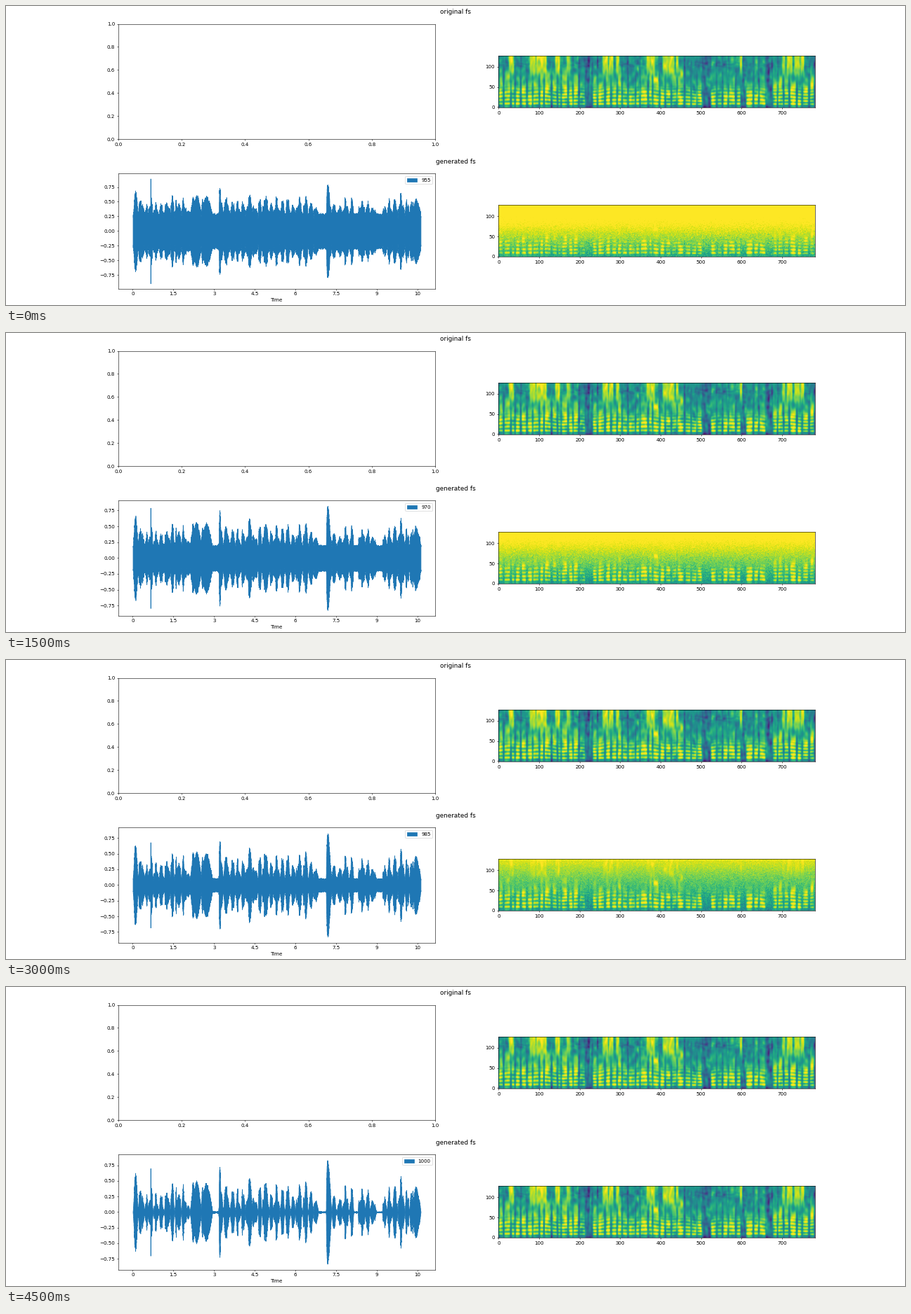
A matplotlib script for the animation above (5000 ms loop, 1280 px wide and 427 px high).

```python
import numpy as np
import matplotlib.pyplot as plt
from matplotlib.animation import FuncAnimation

DPI = 64
plt.rcParams.update({
    "font.family": "DejaVu Sans", "font.size": 8, "figure.titlesize": 10,
    "axes.linewidth": 0.64, "patch.linewidth": 0.8,
    "xtick.major.size": 2.8, "ytick.major.size": 2.8,
    "xtick.major.pad": 2.8, "ytick.major.pad": 2.8,
    "xtick.major.width": 0.64, "ytick.major.width": 0.64,
})

STEPS = 10
DURATION = 10.626          # seconds of audio
ROWS, COLS = 128, 782
SYLLABLE = 0.2             # mean length in seconds

# Spoken phrases, separated by pauses (seconds)
PHRASES = [(0, 2.93), (3.15, 6.85), (7.12, 8.15), (8.3, 9.0), (9.2, DURATION)]
# Stressed sounds: onset, length, loudness
STRESSED = [(.03, .16, .63), (2.25, .28, .51), (2.58, .36, .48),
            (3.17, .09, .74), (4.24, .17, .57), (6.33, .13, .5),
            (9.85, .1, .58), (10.35, .26, .42)]
MAIN_ONSET, MAIN_LENGTH = 7.13, .2
CLICK_AT = .653


def split_syllables():
    rng = np.random.default_rng(12)
    spans = []
    for start, end in PHRASES:
        count = round((end - start) / SYLLABLE)
        edges = np.linspace(start, end, count + 1)
        edges[1:-1] += rng.uniform(-.045, .045, count - 1)
        spans += zip(edges[:-1], edges[1:], rng.uniform(.2, .42, count))
    return spans


def smooth(a, width, axis=-1):
    window = np.hanning(width + 2)[1:-1]
    window /= window.sum()
    return np.apply_along_axis(np.convolve, axis, a, window, "same")


def field(rng, height, width):
    """Blurred unit-variance noise over the spectrogram."""
    a = rng.standard_normal((ROWS, COLS))
    a = smooth(smooth(a, height, 0), width, 1)
    return a / a.std()


def sigmoid(x):
    return 1 / (1 + np.exp(-np.clip(x, -40, 40)))


def box(x, start, end, edge=.012):
    return sigmoid((x - start) / edge) * sigmoid((end - x) / edge)


def bump(time, start, length, skew):
    phase = np.clip((time - start) / length, 0, 1)
    return np.abs(np.sin(np.pi * phase ** skew))


def clean_spectrogram():
    rng = np.random.default_rng(4)
    time = np.linspace(0, DURATION, COLS)
    row = np.arange(ROWS)[:, None]
    voiced, reach, hiss = np.zeros(COLS), np.full(COLS, 60.), np.zeros(COLS)
    for start, end, loud in SYLLABLES:
        length = end - start
        span = box(time, start + .08 * length, end - .14 * length)
        voiced = np.maximum(voiced, (.7 + .7 * loud) * span)
        reach += span * rng.uniform(-18, 30)
        if rng.random() < .45:
            width = rng.uniform(.08, .24)
            hiss = np.maximum(hiss, box(time, end - width / 2, end + width / 2))
    voiced = np.minimum(voiced, 1)

    pitch = 205 + 16 * np.sin(time * 1.7) + 10 * np.sin(time * 5.3)
    mel = row * 45 / ROWS
    hertz = np.where(mel < 15, mel * 200 / 3, 1000 * 6.4 ** ((mel - 15) / 27))
    stripes = np.cos(2 * np.pi * hertz / pitch) * sigmoid((42 - row) / 5)
    tone = (.86 - .32 * sigmoid((row - reach) / 9) + .17 * stripes
            + .08 * field(rng, 24, 14) - .5 * np.exp(-row / 3))
    rest = (.4 + .09 * field(rng, 50, 9) + .05 * field(rng, 14, 14)
            - .25 * np.exp(-row / 4))
    out = rest + voiced * (tone - rest)
    out -= .1 * np.exp(-((row - 106) / 9) ** 2) * sigmoid(4 * field(rng, 8, 16))
    bright = .93 + .05 * field(rng, 24, 8)
    out += hiss * sigmoid((row - 82) / 6) * (bright - out)
    return np.clip(out, 0, 1)


def noisy_spectrogram(step):
    if step == STEPS - 1:
        return CLEAN
    rng = np.random.default_rng(100 + step)
    height = np.linspace(0, 1, ROWS)[:, None]
    low, high = .57 - .02 * step, 1.36 - .065 * step
    noise = low + (high - low) * height
    noise = noise + (.14 - .09 * height) * rng.standard_normal((ROWS, COLS))
    return np.clip(np.logaddexp(22 * CLEAN, 22 * noise) / 22, 0, 1)


def peak_levels(step):
    """Loudness of the click and of the main burst."""
    click = np.interp(step, [0, 1, 2, 6, 9], [.893, .89, .826, .68, .7])
    main = np.interp(step, [0, 3, 5, 7, 9], [.82, .825, .81, .86, .84])
    return click, main


def wave_envelope(step):
    rng = np.random.default_rng(200 + step)
    shape = np.random.default_rng(9)
    time = np.linspace(0, DURATION, 4100)
    click, main = peak_levels(step)
    floor = .3 * (1 - step / (STEPS - 1))

    voice = np.full(time.size, .015)
    for start, end, loud in SYLLABLES:
        voice = np.maximum(voice, loud * bump(time, start, end - start, .8))
    voice *= np.clip(.85 + 2 * smooth(shape.standard_normal(time.size), 30), .5, 1.2)
    for start, length, loud in STRESSED:
        voice = np.maximum(voice, loud * bump(time, start, length, .65))

    env = (floor * rng.uniform(.7, 1, time.size)
           + voice * (1 - 1.1 * floor) * rng.uniform(.78, 1, time.size))
    burst = main * bump(time, MAIN_ONSET, MAIN_LENGTH, .55)
    env = np.maximum(env, burst * rng.uniform(.85, 1, time.size))
    env[np.abs(time - CLICK_AT) < .007] = click
    return time, env


SYLLABLES = split_syllables()
CLEAN = clean_spectrogram()

fig = plt.figure(figsize=(1280 / DPI, 427 / DPI), dpi=DPI, facecolor="white")
top, bottom = fig.subfigures(2, 1)
top.suptitle("original fs")
bottom.suptitle("generated fs")
_, ax_clean = top.subplots(1, 2)
ax_wave, ax_noisy = bottom.subplots(1, 2)
ax_clean.imshow(CLEAN, origin="lower", vmin=0, vmax=1)
image = ax_noisy.imshow(CLEAN, origin="lower", vmin=0, vmax=1)


def update(step):
    ax_wave.clear()
    time, env = wave_envelope(step)
    ax_wave.fill_between(time, -env, env, step="post", color="C0",
                         label=str(955 + 5 * step))
    limit = 1.1 * max(peak_levels(step))
    ax_wave.set_xlim(-.05 * DURATION, 1.05 * DURATION)
    ax_wave.set_ylim(-limit, limit)
    ticks = np.arange(0, DURATION, 1.5)
    ax_wave.set_xticks(ticks, [f"{t:.2g}" for t in ticks])
    ax_wave.set_xlabel("Time", labelpad=2.4)
    ax_wave.legend(loc="upper right")
    image.set_data(noisy_spectrogram(step))


anim = FuncAnimation(fig, update, frames=STEPS, interval=500, repeat=True,
                     repeat_delay=0, init_func=lambda: update(0))
plt.show()
```
